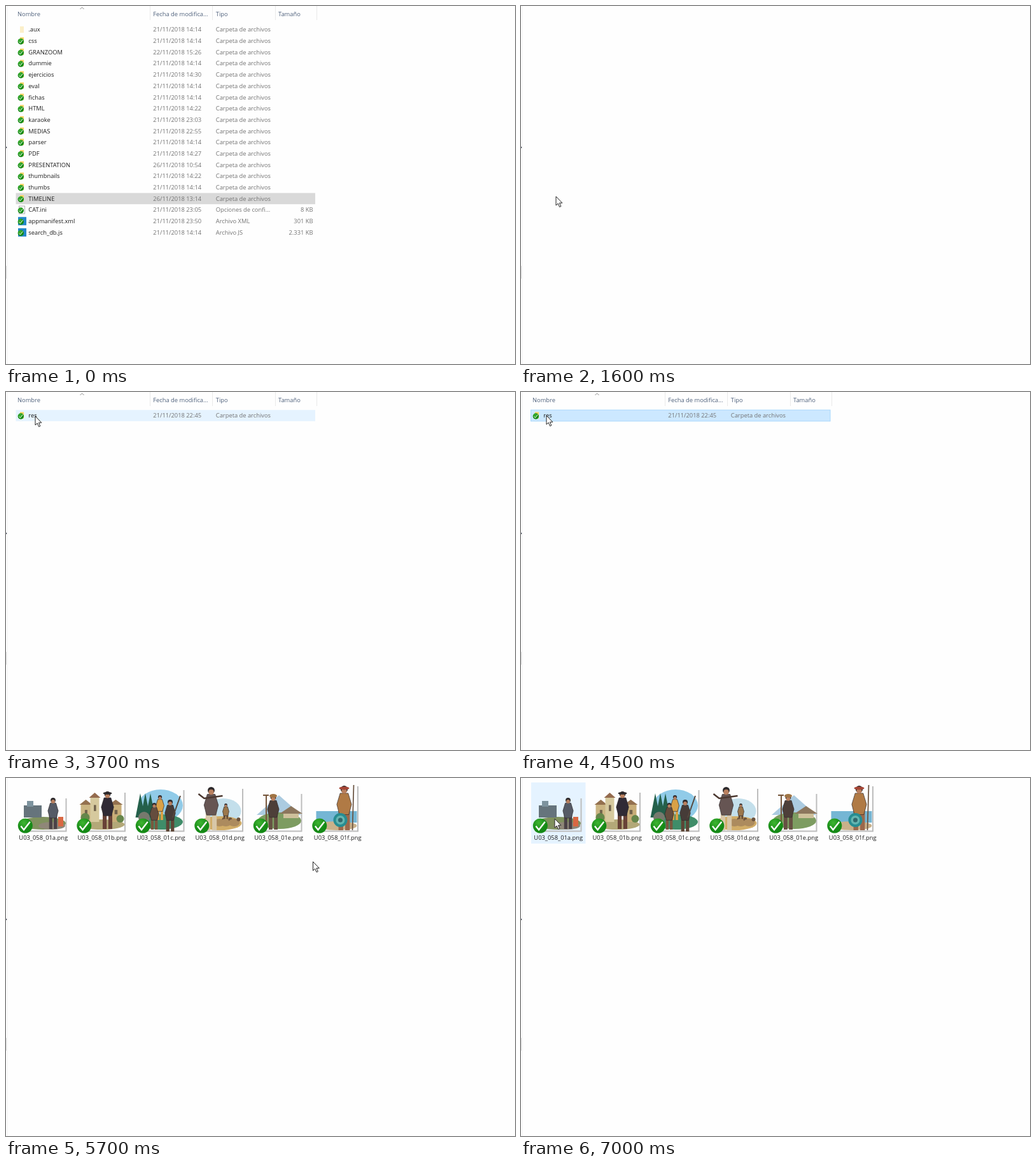
Animation, 800 px wide and 562 px high, one loop 7100 ms. Source, as an HTML page:

```html
<!DOCTYPE html>
<html lang="es">
<head>
<meta charset="utf-8">
<style>
  html, body { margin: 0; width: 100%; height: 100%; overflow: hidden; background: #fefefe; }
  svg { display: block; width: 800px; height: 562px; }
  text { font: 9.33px "Open Sans", "Noto Sans", sans-serif; fill: #1c1c1c; white-space: pre; }
  .meta { fill: #737373; }
  .head { fill: #4f617c; }
  .hidden { display: none; }
</style>
</head>
<body>
<svg id="stage" viewBox="0 0 800 562"></svg>
<script>
const LOOP = 7100, STEP = 100, ROW = 17.69, CELL = 92.5;
const COLUMNS = { date: 231.3, type: 329.8, size: 428 };

const rect = (x, y, w, h, fill, extra = '') =>
  `<rect x="${x}" y="${y}" width="${w}" height="${h}" fill="${fill}" ${extra}/>`;
const oval = (x, y, rx, ry, fill) => `<ellipse cx="${x}" cy="${y}" rx="${rx}" ry="${ry}" fill="${fill}"/>`;
const disc = (x, y, r, fill) => oval(x, y, r, r, fill);
const shape = (d, fill, stroke = 'none', width = 1) =>
  `<path d="${d}" fill="${fill}" stroke="${stroke}" stroke-width="${width}"/>`;
const line = (d, stroke, width = 1) => shape(d, 'none', stroke, width);
const peak = (x, base, w, h, fill) => shape(`M${x - w / 2} ${base}h${w}l${-w / 2} ${-h}z`, fill);
const label = (x, y, text, cls = '', anchor = 'start') =>
  `<text x="${x}" y="${y}" class="${cls}" text-anchor="${anchor}">${text}</text>`;
const group = (id, body) => `<g id="${id}">${body}</g>`;
const shift = (x, body) => `<g transform="translate(${x} 0)">${body}</g>`;

// File lists
const stamp = (time, day = 21) => `${day}/11/2018 ${time}`;
const folder = (name, time = '14:14', day = 21) =>
  ({ name, date: stamp(time, day), type: 'Carpeta de archivos', size: '', kind: name[0] === '.' ? 'plain' : 'folder' });
const file = (name, time, type, size, kind) => ({ name, date: stamp(time), type, size, kind });

const lists = {
  root: [
    folder('.aux'), folder('css'), folder('GRANZOOM', '15:26', 22), folder('dummie'),
    folder('ejercicios', '14:30'), folder('eval'), folder('fichas'), folder('HTML', '14:22'),
    folder('karaoke', '23:03'), folder('MEDIAS', '22:55'), folder('parser'), folder('PDF', '14:27'),
    folder('PRESENTATION', '10:54', 26), folder('thumbnails', '14:22'), folder('thumbs'),
    folder('TIMELINE', '13:14', 26),
    file('CAT.ini', '23:05', 'Opciones de confi...', '8 KB', 'page'),
    file('appmanifest.xml', '23:50', 'Archivo XML', '301 KB', 'code'),
    file('search_db.js', '14:14', 'Archivo JS', '2.331 KB', 'code')
  ],
  units: [folder('U01_018_01', '13:25', 26), folder('U01_018_02', '22:45')],
  inner: [folder('res', '22:45')]
};

const badge = (x, y, r) => disc(x, y, r, 'url(#green)') +
  line(`M${x - r * .6} ${y + r * .05}l${r * .4} ${r * .5} ${r * .85} ${-r * 1.1}`, '#fff', r * .2);

const icons = {
  plain: y => rect(22, y - 5, 6, 10, '#fbefc9'),
  folder: y => rect(22, y - 5.5, 6, 10, '#f8d568'),
  page: y => rect(20.5, y - 6, 9, 12, '#fff', 'stroke="#9a9a9a" stroke-width=".8"'),
  code: y => rect(19, y - 6.5, 13, 13, '#2388c9')
};

const listMarkup = rows => rows.map(({ name, date, type, size, kind }, i) => {
  const y = 37 + ROW * i, base = y + 3.4;
  return icons[kind](y) + (kind === 'plain' ? '' : badge(23.3, y + 1, 4.7)) +
    label(35.3, base, name) + label(COLUMNS.date, base, date, 'meta') +
    label(COLUMNS.type, base, type, 'meta') + label(482.5, base, size, 'meta', 'end');
}).join('');

const header = line('M226.5 0V22M324.5 0V22M423.5 0V22M488.5 0V22', '#e9e9e9') +
  line('M116.5 5l3-3 3 3', '#8a8a8a') +
  label(18, 15.6, 'Nombre', 'head') + label(COLUMNS.date, 15.6, 'Fecha de modifica...', 'head') +
  label(COLUMNS.type, 15.6, 'Tipo', 'head') + label(COLUMNS.size, 15.6, 'Tamaño', 'head');

// Illustrations: x is local to the thumbnail, y is on the stage
const INK = '#2e2a2c', SKIN = '#b9805f';
const shadow = (top, w = 71) => line(`M${w + 1.5} ${top + 2}V83.5H2`, '#bdbdbd', 2);

function person(x, top, feet, coat, legs) {
  const h = feet - top, r = h * .08, w = h * .15;
  return line(`M${x - w / 2} ${top + h * .55}V${feet}M${x + w / 2} ${top + h * .55}V${feet}`, legs, w * .7) +
    shape(`M${x - w * .6} ${top + h * .17}h${w * 1.2}l${w * .5} ${h * .25}l${-w * .4} ${h * .23}h${-w * 1.4}l${-w * .4} ${-h * .23}z`, coat, INK, .7) +
    disc(x, top + r, r, INK) + disc(x, top + r * 1.5, r * .75, SKIN);
}

const house = (x, y, w, h, wall, roof) => rect(x, y, w, h, wall) + peak(x + w / 2, y, w + 4, 8, roof) +
  rect(x + w * .4, y + h * .3, w * .25, h * .25, '#71624c');

const scenes = [
  () => shadow(30) + oval(36, 71, 36, 10, '#80915e') + oval(50, 75, 21, 6, '#8f8778') +
    rect(6, 43, 28, 19, '#66747c') + rect(11, 36, 10, 9, '#7d939e') +
    person(52, 31, 80, '#565b66', '#4b4246') + rect(60, 61, 8, 15, '#d96843'),
  () => shadow(21) + oval(36, 73, 36, 8, '#b3a878') +
    house(3, 42, 16, 27, '#cbb583', '#94714f') + house(49, 42, 18, 27, '#c8ad78', '#94714f') +
    house(18, 31, 14, 38, '#d6c99e', '#946b4e') + disc(10, 62, 7, '#66864b') + disc(65, 64, 6, '#66864b') +
    person(45, 21, 80, '#302a35', '#684237') + oval(45, 24, 7, 2, INK),
  () => shadow(17) + oval(36, 43, 35, 25, '#91cbe8') + oval(36, 69, 35, 12, '#3f8d69') +
    [4, 12, 20].map(x => peak(x, 62, 15, 38, '#24604a')).join('') +
    person(35, 27, 66, '#d9a147', '#d9a147') + disc(10, 62, 9, '#77796d') +
    person(26, 39, 81, '#654d3e', '#79583e') + person(51, 34, 84, '#463c38', '#5d4636') +
    line('M55 62L67 28', '#56483d', 2),
  () => shadow(15) + oval(42, 52, 28, 20, '#c3dfeb') + oval(37, 71, 34, 11, '#d1ad68') +
    person(46, 40, 70, '#9b774c', '#6d4e36') +
    [36, 46, 59].map(x => oval(x, 70, 9, 6, '#ac8b5e') + disc(x + 7, 65, 3, '#6d543e')).join('') +
    person(23, 14, 82, '#665553', '#d8c7a8') + line('M3 25l9 7 29-4', '#4b3830', 2.5),
  () => shadow(23) + peak(37, 58, 70, 31, '#abcbe0') + oval(38, 67, 34, 13, '#7d9c61') +
    peak(56, 56, 36, 12, '#8c765d') + rect(44, 56, 24, 7, '#cec09b') +
    person(28, 26, 81, '#4d3f39', '#665043') + oval(28, 28, 6, 3, '#9f7444') +
    line('M17 28v53M12 27h9', '#75553a', 2),
  () => shadow(11, 67) + rect(3, 52, 64, 18, '#75b6d4') + oval(35, 75, 32, 7, '#cab18a') +
    person(47, 12, 82, '#b07a45', '#9b684b') + oval(47, 16, 8, 2.5, '#a54535') +
    line('M62 11l-2 71', '#68513f', 1.7) +
    disc(41, 66, 11, '#278d92') + disc(41, 66, 7, '#64b5b0') + disc(41, 66, 3.5, '#31686c')
];

const genericImage = shape('M11 13h37l14 14v55h-51z', '#f5f5f5', '#dadada') +
  shape('M48 13v14h14z', '#e1e1e1', '#d2d2d2') +
  rect(18, 30, 37, 38, '#0d7cda') + rect(22, 35, 29, 28, '#f5faff') +
  shape('M22 57l9-15 7 9 4-5 9 14v3h-29z', '#0d7cda');

const cell = (body, i) => shift(22 + CELL * i, body);
const pictures = scenes.map((draw, i) => cell(draw(), i));
const captions = [...'abcdef'].map((letter, i) =>
  cell(badge(8.3, 75, 11.5) + label(36.7, 97.2, `U03_058_01${letter}.png`, '', 'middle'), i));
const thumbs = pictures.slice(0, 4).join('') +
  group('generic', cell(genericImage, 4) + cell(genericImage, 5)) +
  group('loaded', pictures.slice(4).join('')) + captions.join('');

const el = id => document.getElementById(id);
el('stage').innerHTML =
  '<radialGradient id="green" cx=".4" cy=".3"><stop stop-color="#3fb532"/><stop offset="1" stop-color="#158a16"/></radialGradient>' +
  line('M2.5 0V562', '#f5f5f5') + rect(0, 408, 1, 20, '#d8d8d8') + disc(0, 222, 1.3, '#34394a') +
  '<rect id="highlight"/>' + group('header', header) +
  Object.keys(lists).map(id => group(id, listMarkup(lists[id]))).join('') +
  group('message', label(630, 45, 'Trabajando en ello...', 'meta', 'end')) +
  group('thumbs', thumbs) +
  group('cursor', shape('M0 0V14L3.2 11 5.6 16.5 7.8 15.5 5.5 10.2H9.8Z', '#fff', '#222'));

// Each pointer move eases out to a resting place; dip bows the path downwards
const moves = [
  { start: 100, end: 900, x: 55, y: 299 },
  { start: 2100, end: 2900, x: 64, y: 37 },
  { start: 3600, end: 3700, x: 46, y: 38 },
  { start: 3700, end: 4100, x: 40, y: 37 },
  { start: 5100, end: 5900, x: 512, y: 66, dip: 95 },
  { start: 6100, end: 6400, x: 341, y: 67 },
  { start: 6400, end: 7000, x: 53, y: 64 }
];

function pointerAt(t) {
  let x = 672, y = 535;
  for (const move of moves) {
    if (t <= move.start) break;
    const k = Math.min(1, (t - move.start) / (move.end - move.start));
    const eased = 1 - (1 - k) ** 2;
    x += (move.x - x) * eased;
    y += (move.y - y) * eased + (move.dip || 0) * Math.sin(Math.PI * k);
  }
  return [x, y];
}

function viewAt(t) {
  if (t < 1600) return 'root';
  if (t < 1700) return 'blank';
  if (t < 3300) return 'units';
  if (t < 3500) return 'message';
  if (t < 4900) return 'inner';
  return t < 5100 ? 'message' : 'thumbs';
}

function placeHighlight(x, y, width, height, fill, stroke = 'none') {
  const attrs = { x, y, width, height, fill, stroke };
  for (const key in attrs) el('highlight').setAttribute(key, attrs[key]);
}

function highlightRow(t, view, x, y) {
  const hovered = t >= 100 && x >= 16 && x < 486 ? Math.floor((y - 28) / ROW) : -1;
  const selected = view === 'root' ? 15 : t >= (view === 'units' ? 3000 : 4400) ? 0 : -1;
  const row = lists[view][hovered] ? hovered : selected;
  if (row < 0) return;
  const fill = row !== selected ? '#e5f3ff' : row === hovered ? '#cce8ff' : '#d9d9d9';
  const stroke = fill === '#cce8ff' && view !== 'root' ? '#a9d8fb' : 'none';
  placeHighlight(15.5, 28.2 + ROW * row, 470.5, 17.6, fill, stroke);
}

function highlightThumb(x, y) {
  const i = Math.floor((x - 16) / CELL);
  if (y < 103 && x - 16 - i * CELL < 86) placeHighlight(16 + CELL * i, 7, 85.5, 96, '#e5f3ff');
}

const show = (id, visible) => el(id).classList.toggle('hidden', !visible);

function draw(now) {
  const t = Math.floor(now % LOOP / STEP) * STEP;
  const view = viewAt(t), [x, y] = pointerAt(t);
  for (const id of [...Object.keys(lists), 'message', 'thumbs']) show(id, id === view);
  show('header', view !== 'blank' && view !== 'thumbs');
  show('generic', t < 5300);
  show('loaded', t >= 5300);
  show('cursor', t >= 100);
  el('cursor').setAttribute('transform', `translate(${x} ${y})`);
  placeHighlight(0, 0, 0, 0, 'none');
  if (lists[view]) highlightRow(t, view, x, y);
  if (view === 'thumbs') highlightThumb(x, y);
}

function tick() {
  draw(performance.now());
  requestAnimationFrame(tick);
}
tick();
</script>
</body>
</html>
```
